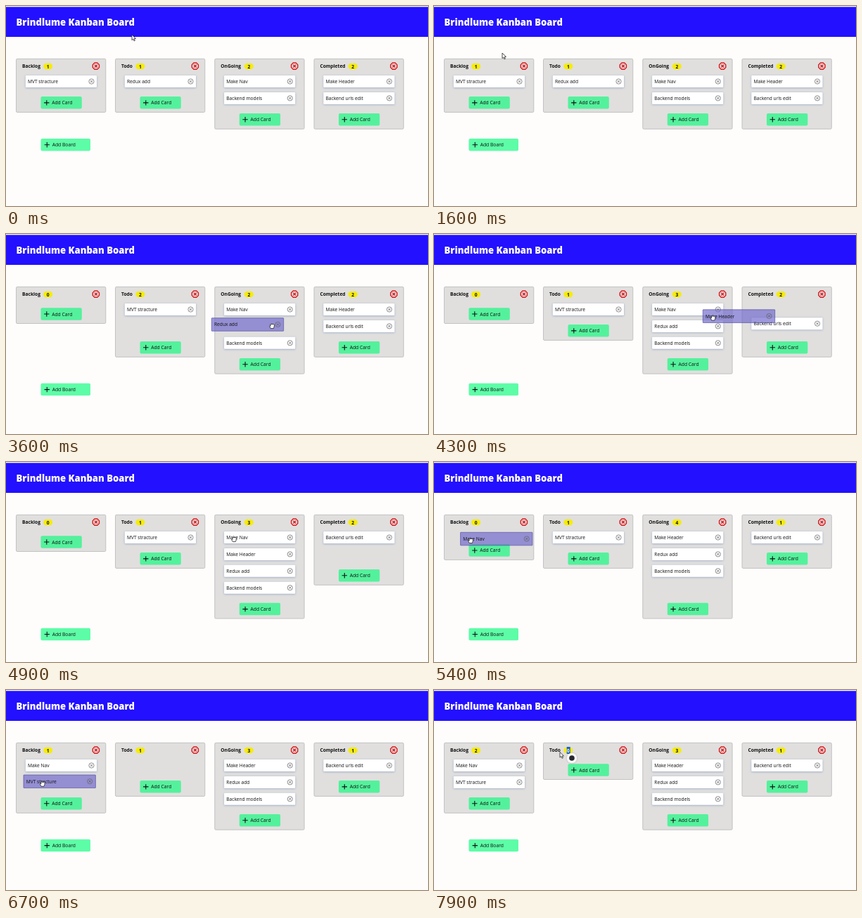
Write an HTML page with a canvas that moves like this. It is 600 by 285 pixels and loops after 8 s.

```html
<!DOCTYPE html>
<html lang="en">
<head>
<meta charset="utf-8">
<title>Kanban board</title>
<style>
  html, body { margin: 0; width: 100%; height: 100%; overflow: hidden; background: #fefdfc; }
  canvas { display: block; width: 600px; height: 285px; }
</style>
</head>
<body>
<canvas id="stage"></canvas>
<script>
const W = 600, H = 285, LOOP = 8000, TICK = 100;
const PITCH = 23.9;
const FONT = '"Open Sans", "Noto Sans", sans-serif';
const canvas = document.getElementById('stage');
const ctx = canvas.getContext('2d');
const dpr = window.devicePixelRatio || 1;
canvas.width = W * dpr;
canvas.height = H * dpr;

const columns = [
  { name: 'Backlog', x: 14.5, badge: 59.7, cards: ['MVT stracture'] },
  { name: 'Todo', x: 155.5, badge: 190.9, cards: ['Redux add'] },
  { name: 'OnGoing', x: 296.8, badge: 345.3, cards: ['Make Nav', 'Backend models'] },
  { name: 'Completed', x: 438, badge: 493.2, cards: ['Make Header', 'Backend urls edit'] }
];

// out: leaves its column, over: enters the new one, commit: settled there
const moves = [
  { card: 'MVT stracture', from: 0, to: 1, slot: 0, grab: 2200, out: 2500, over: 2620, release: 2800, commit: 3000 },
  { card: 'Redux add', from: 1, to: 2, slot: 1, grab: 3200, out: 3350, over: 3380, release: 3750, commit: 3930 },
  { card: 'Make Header', from: 3, to: 2, slot: 1, grab: 4100, out: 4250, over: 4300, release: 4620, commit: 4830 },
  { card: 'Make Nav', from: 2, to: 0, slot: 0, grab: 4920, out: 5050, over: 5300, release: 5500, commit: 5780 },
  { card: 'MVT stracture', from: 1, to: 0, slot: 1, grab: 5980, out: 6200, over: 6400, release: 6750, commit: 6985 }
];

// time, x, y
const path = [
  [0, 179, 41], [500, 152, 30], [1000, 112, 48], [1600, 97, 67], [1800, 99, 76],
  [2200, 103.5, 113], [2600, 180, 115], [2800, 243, 114], [3200, 254, 133.5],
  [3600, 378, 131], [3750, 394, 132], [4100, 465, 110], [4500, 328, 129],
  [4620, 327, 130], [4900, 324, 110], [4920, 324, 110], [5450, 45, 112],
  [5600, 60, 112], [5980, 195, 111], [6050, 195, 111], [6600, 52, 134],
  [7000, 50, 132], [7200, 56, 122], [7600, 190, 87], [7900, 179, 88.5]
];

const ease = p => { p = Math.min(1, Math.max(0, p)); return p * p * (3 - 2 * p); };
const since = (t, start, span = 200) => ease((t - start) / span);
const slotY = i => 107.5 + PITCH * i;
const mix = (a, b, p) => a + (b - a) * p;

function pointer(t) {
  const i = path.findIndex(k => k[0] > t);
  if (i < 0) return path[path.length - 1].slice(1);
  const a = path[i - 1], b = path[i];
  const p = ease((t - a[0]) / (b[0] - a[0]));
  return [mix(a[1], b[1], p), mix(a[2], b[2], p)];
}

function listsAt(t) {
  const lists = columns.map(c => c.cards.slice());
  for (const m of moves) {
    if (t < m.commit) break;
    lists[m.from].splice(lists[m.from].indexOf(m.card), 1);
    lists[m.to].splice(m.slot, 0, m.card);
  }
  return lists;
}

function text(str, x, y, size, weight = 400, color = '#111', align = 'left') {
  ctx.font = `${weight} ${size}px ${FONT}`;
  ctx.fillStyle = color;
  ctx.textAlign = align;
  ctx.fillText(str, x, y);
}

function box(x, y, w, h, r, fill, stroke) {
  ctx.beginPath();
  ctx.roundRect(x, y, w, h, r);
  ctx.fillStyle = fill;
  ctx.fill();
  if (stroke) {
    ctx.strokeStyle = stroke;
    ctx.lineWidth = 0.8;
    ctx.stroke();
  }
}

function cross(x, y, r, color, width) {
  ctx.beginPath();
  ctx.moveTo(x - r, y - r); ctx.lineTo(x + r, y + r);
  ctx.moveTo(x + r, y - r); ctx.lineTo(x - r, y + r);
  ctx.strokeStyle = color;
  ctx.lineWidth = width;
  ctx.stroke();
}

function disc(x, y, r, fill) {
  ctx.beginPath();
  ctx.arc(x, y, r, 0, Math.PI * 2);
  ctx.fillStyle = fill;
  ctx.fill();
}

function removeIcon(x, y) {
  ctx.beginPath();
  for (let i = 0; i < 8; i++) {
    const a = (i + 0.5) * Math.PI / 4;
    ctx.lineTo(x + 5 * Math.cos(a), y + 5 * Math.sin(a));
  }
  ctx.closePath();
  ctx.strokeStyle = '#dc1c1f';
  ctx.lineWidth = 1.4;
  ctx.stroke();
  cross(x, y, 1.9, '#dc1c1f', 1.4);
}

function button(x, y, w, label, color, gap) {
  box(x, y, w, 17.5, 2, color);
  const cx = x + gap, cy = y + 8.8;
  ctx.beginPath();
  ctx.moveTo(cx - 3.7, cy); ctx.lineTo(cx + 3.7, cy);
  ctx.moveTo(cx, cy - 3.7); ctx.lineTo(cx, cy + 3.7);
  ctx.strokeStyle = '#111';
  ctx.lineWidth = 1.1;
  ctx.stroke();
  text(label, cx + 7.4, cy + 2.5, 6.75);
}

function card(label, x, y, held) {
  if (held) {
    box(x + 0.3, y - 9.2, 102.4, 18.6, 0.5, 'rgba(112,105,205,.68)', 'rgba(70,65,150,.75)');
  } else {
    ctx.save();
    ctx.shadowColor = 'rgba(130,150,185,.75)';
    ctx.shadowBlur = 3 * dpr;
    ctx.shadowOffsetY = 0.7 * dpr;
    box(x + 0.8, y - 8.5, 101.2, 17, 1, '#fff');
    ctx.restore();
  }
  text(label, x + 4, y + 2.5, 6.65);
  ctx.beginPath();
  ctx.arc(x + 94.5, y, 3.6, 0, Math.PI * 2);
  ctx.strokeStyle = '#666';
  ctx.lineWidth = 0.75;
  ctx.stroke();
  cross(x + 94.5, y, 1.5, '#555', 0.75);
}

function arrow(x, y) {
  ctx.beginPath();
  [[0, 0], [0, 7.6], [1.8, 6], [3.1, 8.8], [4.4, 8.2], [3.2, 5.5], [5.5, 5.4]]
    .forEach(([dx, dy]) => ctx.lineTo(x + dx, y + dy));
  ctx.closePath();
  ctx.fillStyle = '#fff';
  ctx.fill();
  ctx.strokeStyle = '#222';
  ctx.lineWidth = 0.8;
  ctx.stroke();
}

function hand(x, y) {
  ctx.beginPath();
  ctx.moveTo(x - 1.7, y + 3.6);
  ctx.lineTo(x - 3.3, y + 0.6);
  ctx.quadraticCurveTo(x - 3.2, y - 0.7, x - 1.8, y + 0.2);
  ctx.lineTo(x - 2, y - 2.2);
  for (let i = 0; i < 4; i++) {
    const fx = x - 2 + i * 1.35;
    ctx.quadraticCurveTo(fx + 0.65, y - 4.2 + Math.abs(i - 1) * 0.4, fx + 1.35, y - 2);
  }
  ctx.lineTo(x + 3.3, y + 1);
  ctx.lineTo(x + 2.4, y + 3.6);
  ctx.closePath();
  ctx.fillStyle = '#fff';
  ctx.fill();
  ctx.strokeStyle = '#222';
  ctx.lineWidth = 0.8;
  ctx.stroke();
}

function draw(t) {
  ctx.setTransform(dpr, 0, 0, dpr, 0, 0);
  ctx.fillStyle = '#fefdfc';
  ctx.fillRect(0, 0, W, H);
  ctx.fillStyle = '#2210ff';
  ctx.fillRect(0, 1.3, W, 42.7);
  text('Brindlume Kanban Board', 14.5, 28.4, 13.1, 800, '#fff');

  const lists = listsAt(t), counts = listsAt(t - 100);
  const sizes = lists.map(l => l.length);
  const drag = moves.find(m => t >= m.grab && t < m.commit);
  if (drag) sizes[drag.to] += since(t, drag.over);
  for (const m of moves) {
    if (t >= m.commit) sizes[m.from] += 1 - since(t, m.commit + 80);
  }

  const marked = t >= 7700;
  columns.forEach((col, c) => {
    const { x } = col, n = sizes[c];
    box(x, 75.3, 127.3, 52.2 + PITCH * n, 1.5, '#e0dfde', '#b8b8b8');
    text(col.name, x + 8.5, 88.4, 6.65, 700);
    box(col.badge - 6.5, 81.8, 13, 8.4, 4.2, '#f6ec08');
    const lit = marked && c === 1;
    if (lit) {
      ctx.fillStyle = '#1c62c4';
      ctx.fillRect(col.badge - 2.2, 81, 5, 10);
    }
    text(counts[c].length, col.badge, 88.5, 6.65, 700, lit ? '#fff' : '#111', 'center');
    removeIcon(x + 113.4, 85.6);
    button(x + 35, 105.2 + PITCH * n, 58.3, 'Add Card', '#54f19c', 8.3);

    const home = drag && drag.from === c ? lists[c].indexOf(drag.card) : -1;
    lists[c].forEach((label, i) => {
      if (i === home) return;
      let row = i;
      if (home >= 0 && i > home) row -= since(t, drag.out);
      if (drag && drag.to === c && i >= drag.slot) row += since(t, drag.over);
      card(label, x + 12.5, slotY(row), false);
    });
  });

  button(49.5, 141.1 + PITCH * Math.max(...sizes), 70.5, 'Add Board', '#5dfda7', 8.8);

  const [px, py] = pointer(t);
  if (drag) {
    const start = pointer(drag.grab), end = pointer(Math.min(t, drag.release));
    const p = since(t, drag.release, drag.commit - drag.release);
    const x = columns[drag.from].x + 12.5 + end[0] - start[0];
    const y = slotY(lists[drag.from].indexOf(drag.card)) + end[1] - start[1];
    card(drag.card, mix(x, columns[drag.to].x + 12.5, p), mix(y, slotY(drag.slot), p), true);
  }

  if (marked) {
    ctx.save();
    ctx.shadowColor = 'rgba(0,0,0,.25)';
    ctx.shadowBlur = 2 * dpr;
    disc(196, 97, 7.3, '#f8f8f8');
    ctx.restore();
    disc(196, 97, 3.8, '#26282c');
  }

  if (t >= 2000 && t < 7050) hand(px, py);
  else arrow(px, py);
}

let begin = null;
function frame(now) {
  if (begin === null) begin = now;
  const t = (now - begin) % LOOP;
  draw(Math.floor(t / TICK) * TICK);
  requestAnimationFrame(frame);
}
draw(0);
requestAnimationFrame(frame);
</script>
</body>
</html>
```
